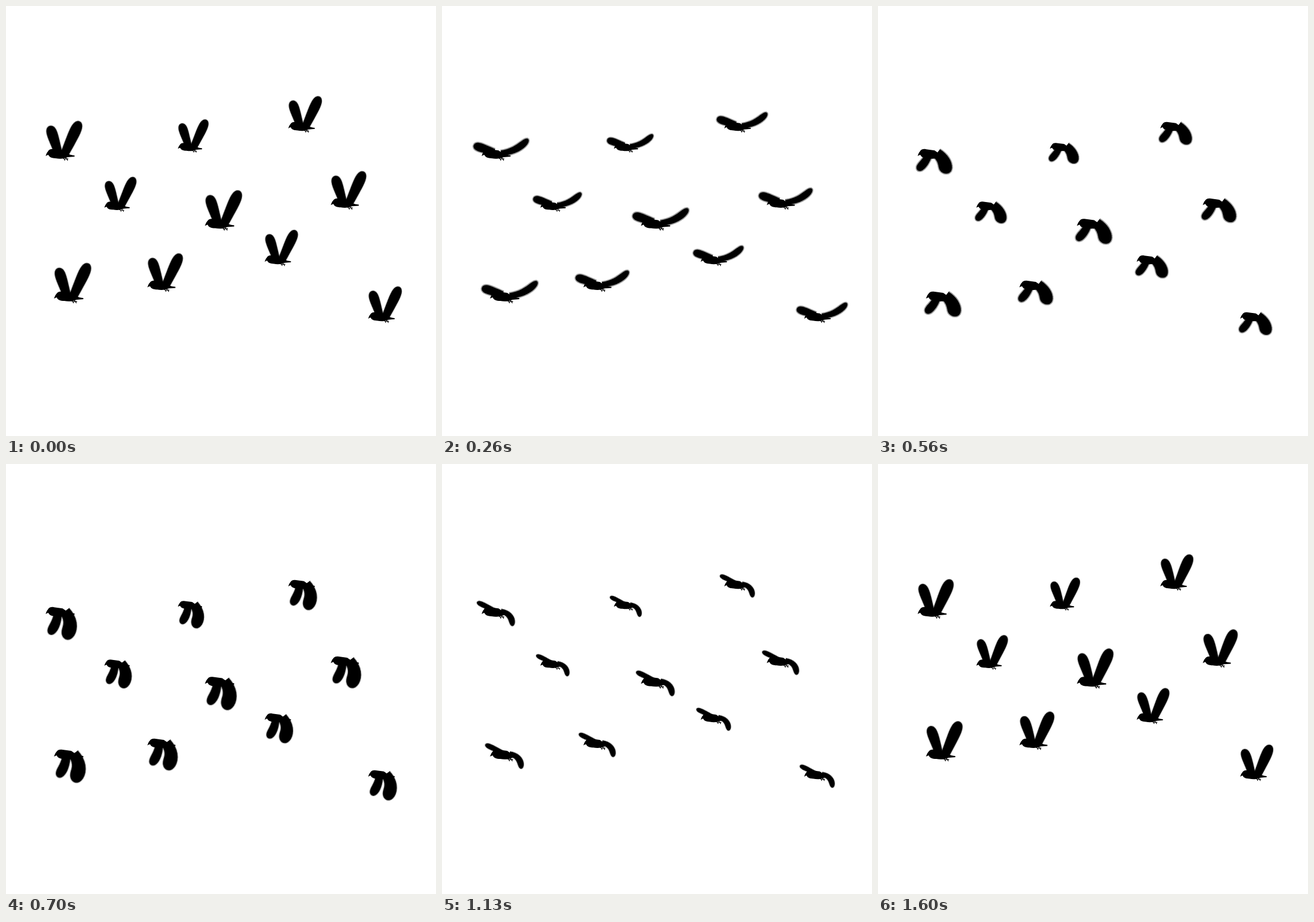
An HTML page with a canvas for the animation above (1.64 s loop, 748 by 748 pixels).

```html
<!DOCTYPE html>
<html lang="en">
<head>
<meta charset="utf-8">
<title>Flock</title>
<style>
  html, body { margin: 0; width: 100%; height: 100%; overflow: hidden; background: #fff; }
  canvas { display: block; }
</style>
</head>
<body>
<canvas id="stage" width="748" height="748"></canvas>
<script>
const ctx = document.getElementById('stage').getContext('2d');
const LOOP = 1640, STEPS = 24, SAMPLES = 14;

// Beak position and scale of each bird
const flock = [
  [69, 260, .985], [299, 247.5, .825], [491, 212, .905], [171, 350, .865], [346, 381.5, 1],
  [565, 345.5, .955], [450, 444, .895], [83.5, 508, 1], [246, 488.5, .955], [630, 543, .905]
];

// Wing beat: at each key step, a wing's tip x, tip y, bend and half width
const beat = [
  { step: 0,  left: [7, -52, 0, 10.5],   right: [60, -60, 0, 11] },
  { step: 4,  left: [-14, -18, 0, 8.5],  right: [82, -29, 11, 7] },
  { step: 6,  left: [-13, 6, 0, 6],      right: [79, 10, 4, 12] },
  { step: 10, left: [6, 36, -8, 9.5],    right: [33, 44, -19, 14] },
  { step: 14, left: [14, 34, 0, 12],     right: [29, 33, -36, 5.5] },
  { step: 16, left: [-8, -20, 0, 5],     right: [54, 22, -14, 6] },
  { step: 19, left: [1, -46, 12, 7],     right: [44, -55, 0, 14.5] }
];
const roots = { left: [22, -6], right: [34, -4] };

const body = new Path2D(`M0 1C1-2 2-5 4-7C6-11 10-12 15-11L30-9C36-5 40-1 51 0L51 2
  L39 3C32 6 25 6.5 18 5C11 5 6 3 5-1C3-1 2 0 0 1Z`);
const feet = new Path2D('M30 4L33 6.5L36 6M33 6.5L34 9M35 4L37 6L40 6M37 6L39 9');

// Steps last 1/15 s, two of them 1/10 s
const stepStart = k => Math.floor((2 * k + (k > 5) + (k > 15)) * 10 / 3) * 10;

function stepAt(time) {
  let k = STEPS - 1;
  while (stepStart(k) > time) k--;
  return k;
}

function wingPose(side, step) {
  const i = beat.findLastIndex(key => key.step <= step);
  const from = beat[i], to = beat[i + 1] || { ...beat[0], step: STEPS };
  const u = (step - from.step) / (to.step - from.step);
  const eased = i ? 1 - (1 - u) ** 1.5 : u ** 1.3;
  return from[side].map((v, j) => v + (to[side][j] - v) * eased);
}

// Leaf with a rounded tip along a quadratic spine
function wingPath(side, step) {
  const [rootX, rootY] = roots[side];
  const [tipX, tipY, bend, halfWidth] = wingPose(side, step);
  const dx = tipX - rootX, dy = tipY - rootY, length = Math.hypot(dx, dy);
  const midX = rootX + dx / 2 - dy / length * bend;
  const midY = rootY + dy / 2 + dx / length * bend;
  const curve = (a, b, c, t) => a * (1 - t) ** 2 + 2 * b * t * (1 - t) + c * t * t;
  const slope = (a, b, c, t) => (b - a) * (1 - t) + (c - b) * t;
  const path = new Path2D();
  for (let i = -SAMPLES; i <= SAMPLES; i++) {
    const t = Math.cos(i / SAMPLES * Math.PI / 2);
    const w = Math.sign(i) * halfWidth * (.65 + .4 * t) * Math.sqrt(1 - t ** 6);
    const sx = slope(rootX, midX, tipX, t), sy = slope(rootY, midY, tipY, t);
    const norm = w / Math.hypot(sx, sy);
    path.lineTo(curve(rootX, midX, tipX, t) - sy * norm, curve(rootY, midY, tipY, t) + sx * norm);
  }
  return path;
}

function drawWing(path, fringe) {
  ctx.lineWidth = fringe;
  ctx.strokeStyle = 'rgba(0,0,0,.25)';
  ctx.stroke(path);
  ctx.setLineDash([1, 1]);
  ctx.strokeStyle = 'rgba(0,0,0,.35)';
  ctx.stroke(path);
  ctx.setLineDash([]);
  ctx.fill(path);
}

function draw(now) {
  const step = stepAt(now % LOOP);
  const wings = ['right', 'left'].map(side => wingPath(side, step));
  const fringe = 2 + 2.5 * Math.exp(-(((step - 6) / 3) ** 2));
  ctx.setTransform(1, 0, 0, 1, 0, 0);
  ctx.fillStyle = '#fff';
  ctx.fillRect(0, 0, 748, 748);
  ctx.fillStyle = '#000';
  for (const [x, y, scale] of flock) {
    ctx.setTransform(scale, 0, 0, scale, x, y);
    wings.forEach(path => drawWing(path, fringe));
    ctx.fill(body);
    ctx.lineWidth = 1.3;
    ctx.strokeStyle = '#000';
    ctx.stroke(feet);
  }
  requestAnimationFrame(() => draw(performance.now()));
}
draw(0);
</script>
</body>
</html>
```
